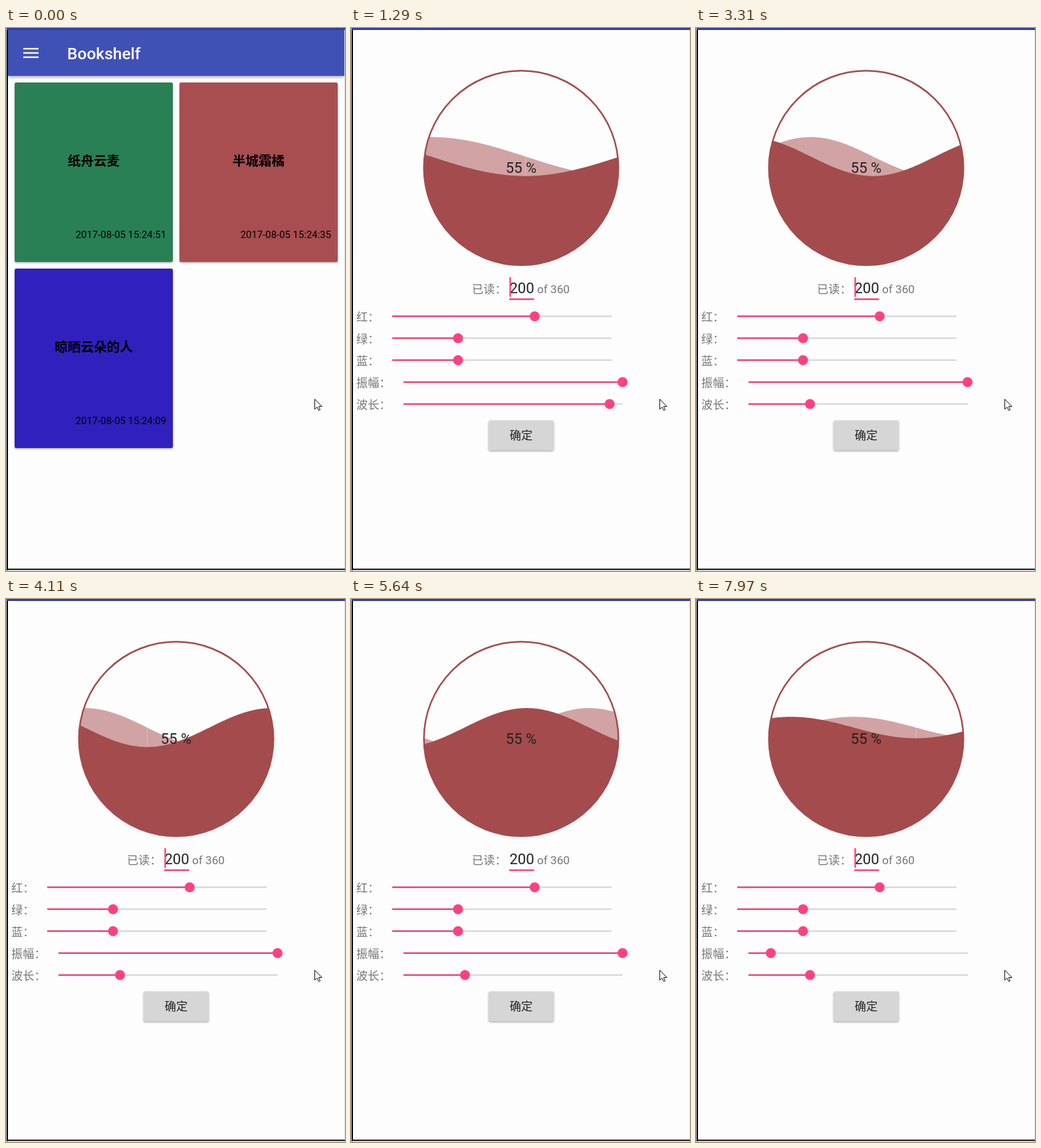
These frames come from a looping animation (510x817 px, 8 s). An HTML page with a canvas:

```html
<!DOCTYPE html>
<html lang="zh-CN">
<head>
<meta charset="utf-8">
<title>Bookshelf</title>
<style>
  html, body { margin: 0; width: 100%; height: 100%; overflow: hidden; background: #fdfdfd; }
  canvas { position: absolute; left: 0; top: 0; }
</style>
</head>
<body>
<canvas id="shelf" width="510" height="817"></canvas>
<canvas id="detail" width="510" height="817"></canvas>
<script>
const LOOP = 8000;
const FONT = 'Roboto, "Noto Sans CJK SC", "Noto Sans CJK", sans-serif';
const PINK = '#ff4081', WINE = '#a44b4d', GREY = '#757575', INK = '#212121';
const detail = document.getElementById('detail');
const shelfCtx = document.getElementById('shelf').getContext('2d');
const detailCtx = detail.getContext('2d');
let g;

// Drawing helpers
function rect(x, y, w, h, color) {
  g.fillStyle = color;
  g.fillRect(x, y, w, h);
}

function disc(x, y, r, color) {
  g.fillStyle = color;
  g.beginPath();
  g.arc(x, y, r, 0, 2 * Math.PI);
  g.fill();
}

function text(str, x, y, size, color, align = 'left', weight = 400) {
  g.font = `${weight} ${size}px ${FONT}`;
  g.textAlign = align;
  g.fillStyle = color;
  g.fillText(str, x, y);
}

function raised(x, y, w, h, color) {
  g.save();
  g.shadowColor = 'rgba(0,0,0,.35)';
  g.shadowBlur = 3;
  g.shadowOffsetY = 1.2;
  g.fillStyle = color;
  g.beginPath();
  g.roundRect(x, y, w, h, 2.5);
  g.fill();
  g.restore();
}

function frameEdges() {
  rect(0, 0, 510, 3, '#303f9f');
  rect(0, 0, 1, 817, '#c8c8c8');
  rect(1, 3, 2, 813, '#000');
  rect(1, 813.5, 509, 2, '#000');
  rect(509, 3, 1, 810, '#e0e0e0');
}

function pointer() {
  g.beginPath();
  [[464.5, 558.5], [464.5, 573.5], [468, 570.3], [470.5, 575.5], [472.6, 574.6],
   [470.4, 569.5], [475.3, 569.5]].forEach(([x, y]) => g.lineTo(x, y));
  g.closePath();
  g.fillStyle = '#fff';
  g.fill();
  g.strokeStyle = '#111';
  g.lineWidth = 1;
  g.stroke();
}

// Motion helpers
const clamp = v => Math.min(1, Math.max(0, v));

// Piecewise linear; continues the outer segments unless held.
function along(t, keys, hold = true) {
  let i = 1;
  while (i < keys.length - 1 && t > keys[i][0]) i++;
  const [t0, v0] = keys[i - 1], [t1, v1] = keys[i];
  const k = (t - t0) / (t1 - t0);
  return v0 + (v1 - v0) * (hold ? clamp(k) : k);
}

const pressed = (t, from, to) => Math.min(clamp((t - from) / 80), clamp((to - t) / 150));

// Book grid
function card(x, y, color, title, date) {
  raised(x, y, 238, 270, color);
  text(title, x + 119, y + 124.5, 19.6, '#000', 'center', 700);
  text(date, x + 228, y + 234, 14.9, '#000', 'right');
}

function drawShelf() {
  g = shelfCtx;
  rect(0, 0, 510, 817, '#fdfdfd');
  g.save();
  g.shadowColor = 'rgba(0,0,0,.4)';
  g.shadowBlur = 5;
  g.shadowOffsetY = 1.5;
  rect(3, 3, 506, 69, '#4051b5');
  g.restore();
  for (const y of [30, 36.4, 42.8]) rect(26, y, 23, 2.3, '#fff');
  text('Bookshelf', 92, 47, 24.5, '#fff', 'left', 500);
  card(13, 82, '#2a8055', '纸舟云麦', '2017-08-05 15:24:51');
  card(261, 82, '#a84e50', '半城霜橘', '2017-08-05 15:24:35');
  card(13, 362, '#3020bd', '晾晒云朵的人', '2017-08-05 15:24:09');
  frameEdges();
  pointer();
}

// Progress page
function liquid(peak, length, amp) {
  g.beginPath();
  g.moveTo(108, 360);
  for (let x = 108; x <= 405; x++)
    g.lineTo(x, 193.4 - amp * Math.cos(2 * Math.PI * (x - peak) / length));
  g.lineTo(405, 360);
  g.fill();
}

function gauge(t, amplitude, wavelength) {
  const length = 293 * (1 + wavelength);
  const amp = 14.65 * (1 + amplitude);
  const turns = along(t, [[1290, .768], [2570, 2.1255], [4110, 3.773], [5640, 5.412],
                          [6600, 6.516], [7970, 8.089]], false);
  const phase = (turns % 1 + 1) % 1;
  const peak = 109.5 + phase * length;
  const seam = 109.5 + ((phase + .5) % 1) * length;

  g.save();
  g.beginPath();
  g.arc(256, 210.5, 146.5, 0, 2 * Math.PI);
  g.clip();
  g.fillStyle = '#d2a3a4';
  liquid(peak + length / 4, length, amp);
  rect(Math.round(seam), 193.4, 1, amp, 'rgba(255,255,255,.25)');
  g.fillStyle = WINE;
  liquid(peak, length, amp);
  g.restore();

  g.strokeStyle = WINE;
  g.lineWidth = 2.5;
  g.beginPath();
  g.arc(256, 210.5, 146.3, 0, 2 * Math.PI);
  g.stroke();
  text('55 %', 256, 218, 22, INK, 'center');
}

function slider(label, y, left, x, press = 0) {
  text(label, 8, y + 6.8, 17.2, GREY);
  rect(left, y - 1.2, 330, 2.4, '#d9d9d9');
  rect(left, y - 1.2, x - left, 2.4, '#ef4381');
  if (press) disc(x, y, 8 + 11.7 * press, `rgba(0,0,0,${.1 * press})`);
  disc(x, y, 7.5 + 3.5 * press, PINK);
}

function drawDetail(t) {
  g = detailCtx;
  rect(0, 0, 510, 817, '#fdfdfd');

  const amplitudeX = along(t, [[5850, 408.5], [5885, 388], [6600, 224], [7100, 112.5]]);
  const wavelengthX = along(t, [[2080, 389], [2570, 273.5], [3000, 171.5]]);
  gauge(t, (amplitudeX - 79.5) / 329, (wavelengthX - 79.5) / 329);

  text('已读：', 182, 398.5, 17.2, GREY);
  text('200', 238.5, 398.5, 22, INK);
  text('of 360', 280, 398.5, 17.2, GREY);
  rect(238, 406.8, 37.5, 2.5, '#ef4381');
  if ((t + 120) % 1000 < 500) rect(238.3, 375, 2.4, 29.5, PINK);

  slider('红：', 433.7, 62, 276.3);
  slider('绿：', 466.7, 62, 161);
  slider('蓝：', 499.7, 62, 161);
  slider('振幅：', 532.8, 79, amplitudeX, pressed(t, 5870, 7350));
  slider('波长：', 565.8, 79, wavelengthX, pressed(t, 2040, 3280));

  raised(207, 590.5, 98, 45, '#d6d6d6');
  text('确定', 256, 619, 17.2, INK, 'center', 500);
  frameEdges();
  pointer();
}

function tick(now) {
  const t = now % LOOP;
  detail.style.opacity = clamp((t - 180) / 300);
  drawDetail(t);
  requestAnimationFrame(tick);
}

drawShelf();
tick(0);
</script>
</body>
</html>
```
